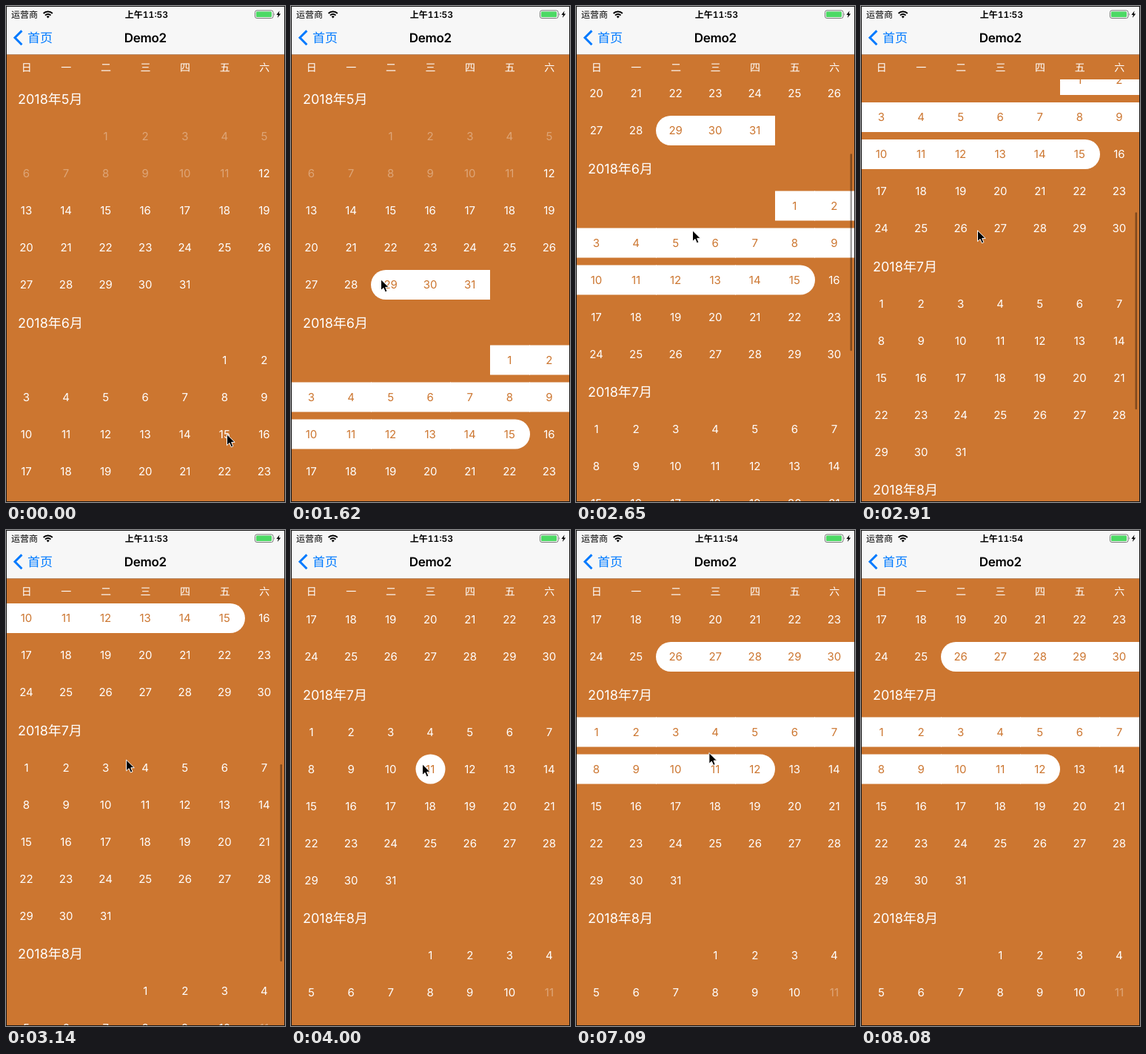
An HTML page for the animation above (8.32 s loop, 377 px wide and 669 px high).

```html
<!DOCTYPE html>
<html lang="zh-CN">
<head>
<meta charset="utf-8">
<title>Demo2</title>
<style>
html, body { margin: 0; width: 100%; height: 100%; overflow: hidden; background: #cc7630; }
svg { display: block; width: 377px; height: 669px; }
text { font-family: Inter, "Noto Sans CJK SC", "Noto Sans CJK", sans-serif; white-space: pre; text-rendering: geometricPrecision; }
.day { font-size: 15px; text-anchor: middle; fill: #fff; }
.day.off { fill-opacity: .35; }
.day.on { fill: #cc7630; }
.month { font-size: 18px; fill: #fff; }
.week { font-size: 14px; text-anchor: middle; fill: #fff; }
.clock { font-size: 12px; font-weight: 600; text-anchor: middle; font-feature-settings: "tnum"; }
.title { font-size: 17px; font-weight: 600; text-anchor: middle; letter-spacing: -.3px; }
</style>
</head>
<body>
<svg viewBox="0 0 377 669" xmlns="http://www.w3.org/2000/svg">
  <defs><clipPath id="view"><rect x="1" y="99" width="375" height="569"/></clipPath></defs>
  <rect width="377" height="669" fill="#cc7630"/>
  <g clip-path="url(#view)"><g id="list"></g></g>
  <rect id="thumb" x="370.5" width="2.5" height="266" rx="1.25" fill="#000" fill-opacity=".38"/>
  <g id="week"></g>

  <rect width="377" height="65" fill="#f7f7f7"/>
  <rect y="65" width="377" height=".5" fill="#a7a7aa"/>
  <text x="7" y="15.5" font-size="12">运营商</text>
  <g fill="none" stroke="#000" stroke-width="2">
    <path d="M50.6 10a8.6 8.6 0 0 1 12.2 0M53 12.6a5.2 5.2 0 0 1 7.4 0"/>
    <path d="M56.7 16.4l-2-2.1a2.9 2.9 0 0 1 4 0z" fill="#000" stroke="none"/>
  </g>
  <text id="clock" class="clock" x="190" y="15.5"></text>
  <rect x="336.5" y="6" width="24.5" height="10.5" rx="2.5" fill="none" stroke="#777"/>
  <rect x="338" y="7.5" width="21" height="7.5" rx="1.2" fill="#4cd964"/>
  <path d="M362 9.5q1.6 1.8 0 3.6z" fill="#777"/>
  <path d="M369.6 6.5l-4.2 5.4h2.5l-1.1 4.2 4.4-5.6h-2.6z"/>
  <path d="M21.4 33.4L12 42.8l9.4 9.4" fill="none" stroke="#007aff" stroke-width="3"/>
  <text x="29" y="49" font-size="17" fill="#007aff">首页</text>
  <text class="title" x="188.3" y="48.7">Demo2</text>

  <rect x=".5" y=".5" width="376" height="668" fill="none" stroke="#161616"/>
  <path id="cursor" d="M.5 .8V15.6L4 12.4 6.3 17.8 8.9 16.7 6.7 11.4H11.2Z" fill="#000" stroke="#fff" stroke-linejoin="round"/>
</svg>
<script>
const LOOP = 8320, COL = 375 / 7, ROW = 50, SECTION = 301.5, R = 20;
const $ = id => document.getElementById(id);

function add(parent, tag, attrs, text = '') {
  const el = document.createElementNS('http://www.w3.org/2000/svg', tag);
  for (const k in attrs) el.setAttribute(k, attrs[k]);
  el.textContent = text;
  parent.append(el);
  return el;
}
const left = c => 1 + COL * c;
const mid = c => left(c + .5);

const cells = [];
[...'日一二三四五六'].forEach((d, i) => add($('week'), 'text', { class: 'week', x: mid(i), y: 87.7 }, d));

for (let month = 5; month <= 8; month++) {
  const top = SECTION * (month - 5);
  const days = new Date(2018, month, 0).getDate();
  const first = new Date(2018, month - 1, 1).getDay();
  add($('list'), 'text', { class: 'month', x: 16, y: 132.3 + top }, `2018年${month}月`);
  for (let d = 1; d <= days; d++) {
    const slot = first + d - 1, col = slot % 7;
    const y = 176 + top + ROW * Math.floor(slot / 7);
    const n = cells.length + 1;
    const off = n < 12 || n > 102 ? ' off' : '';
    cells.push({
      n, col, y,
      bg: add($('list'), 'path', { fill: '#fff' }),
      label: add($('list'), 'text', { class: 'day' + off, x: mid(col) - .3, y: y + 5.4 }, d)
    });
  }
}

// background of one day in the selection a..b
function shape({ n, col, y }, a, b) {
  if (n < a || n > b) return '';
  const l = Math.round(left(col)), r = Math.ceil(left(col + 1)), m = mid(col), top = y - R;
  if (a === b) return `M${m - R} ${y}a20 20 0 0 1 40 0a20 20 0 0 1 -40 0z`;
  const right = n === b ? `H${r - R}a20 20 0 0 1 0 40` : `H${r}v40`;
  const back = n === a ? `H${l + R}a20 20 0 0 1 0 -40` : `H${l}v-40`;
  return `M${n === a ? l + R : l} ${top}${right}${back}z`;
}

// pointer moves: start, end, x, y, button action
const moves = [
  [60, 230, 288, 573],
  [710, 1510, 272, 414, 'press'],
  [1560, 1620, 121, 368, 'drag'],
  [1680, 1850, 117, 354],
  [2020, 2250, 163, 484],
  [2430, 2650, 157, 302],
  [2715, 2910, 157, 302],
  [2974, 3320, 169, 319],
  [3590, 3770, 177, 315],
  [4000, 4000, 177, 315, 'press'],
  [4060, 4640, 123, 168],
  [4880, 4880, 123, 168, 'press'],
  [5170, 5470, 221, 325, 'drag'],
  [7090, 7210, 96, 249],
  [7250, 7410, 275, 495],
  [7740, 8080, 336, 670]
];

// the list follows the flick, then slows down
function scrollAt(t) {
  if (t < 2380) return 0;
  if (t < 2650) return 208 * (t - 2380) / 270;
  return 506.5 - 129 * (Math.max(0, 3316 - t) / 406) ** 1.695;
}

const dayAt = (x, y, t) => cells.find(c =>
  Math.abs(mid(c.col) - x) <= COL / 2 && Math.abs(c.y - scrollAt(t) - y) <= ROW / 2);

// play the moves once, in steps of about 60 ms, noting every state
function record() {
  let x = 298, y = 577, anchor = 0, day = 0;
  const states = [{ t: 0, x, y, a: 0, b: 0 }];
  for (const [from, to, toX, toY, action] of moves) {
    const n = Math.round((to - from) / 60) + 1, x0 = x, y0 = y;
    if (action === 'press') anchor = day = dayAt(x, y, from).n;
    for (let i = 1; i <= n; i++) {
      const t = from + (n > 1 ? (to - from) * (i - 1) / (n - 1) : 0);
      x = x0 + (toX - x0) * i / n;
      y = y0 + (toY - y0) * i / n;
      if (action) day = dayAt(x, y, t)?.n ?? day;
      states.push({ t, x, y, a: Math.min(anchor, day), b: Math.max(anchor, day) });
    }
  }
  return states;
}
const states = record();

let shown;
function draw(time) {
  const state = states.findLast(s => s.t <= time + .5);
  if (state === shown) return;
  shown = state;
  const { t, x, y, a, b } = state, s = scrollAt(t);
  $('list').setAttribute('transform', `translate(0 ${-s})`);
  $('thumb').setAttribute('y', 102 + .467 * s);
  $('thumb').setAttribute('opacity', t < 2430 ? 0 : Math.max(0, Math.min(1, (3770 - t) / 240)));
  $('clock').textContent = t < 5290 ? '上午11:53' : '上午11:54';
  for (const c of cells) {
    c.bg.setAttribute('d', shape(c, a, b));
    c.label.classList.toggle('on', c.n >= a && c.n <= b);
  }
  $('cursor').setAttribute('transform', `translate(${x} ${y})`);
}

const start = performance.now();
function frame() {
  draw((performance.now() - start) % LOOP);
  requestAnimationFrame(frame);
}
frame();
</script>
</body>
</html>
```
